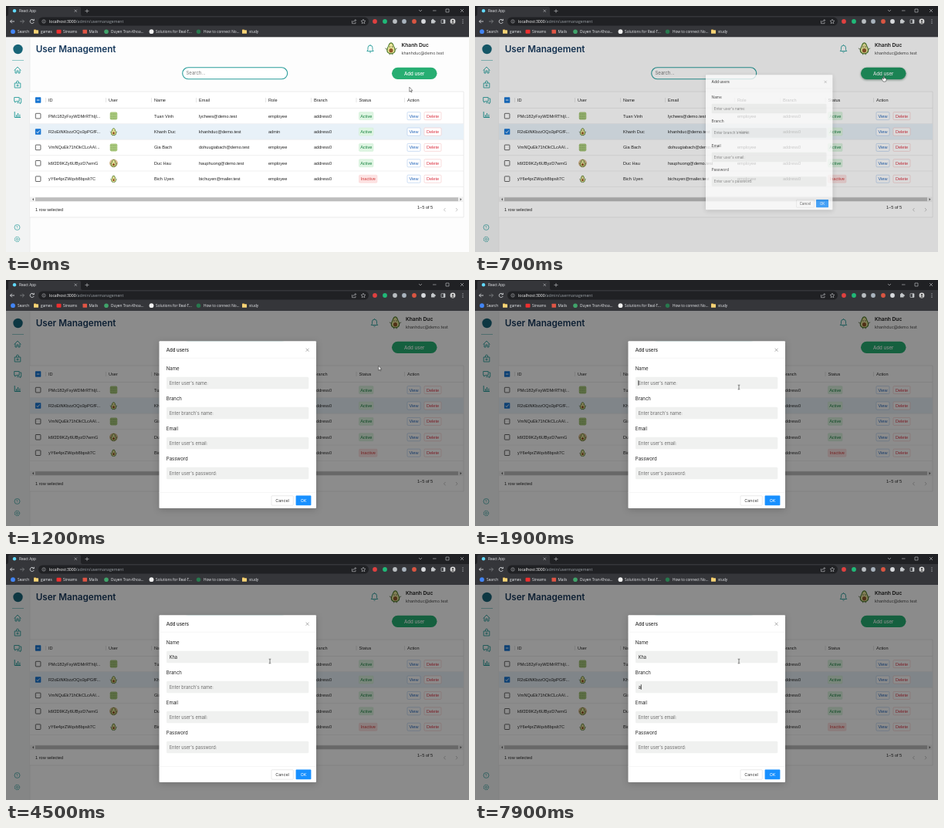
These frames come from a looping animation (600 px wide and 319 px high, 8 s). An HTML page:

```html
<!DOCTYPE html>
<html lang="en">
<head>
<meta charset="utf-8">
<title>User Management</title>
<style>
  html, body { margin: 0; width: 100%; height: 100%; overflow: hidden; background: #fff; }
  svg { display: block; width: 100vw; height: 100vh; }
  text { white-space: pre; }
  .ui { font-family: Inter, "Open Sans", sans-serif; }
  .grid { font-family: "Liberation Sans", Arial, sans-serif; font-size: 5.6px; fill: #222; }
  .chrome { font-family: "Open Sans", "Noto Sans", sans-serif; fill: #e8eaed; }
  #modal { filter: drop-shadow(0 2.2px 4px rgba(0, 0, 0, .18)); }
  #addButton.hover { fill: #1f9862; filter: drop-shadow(0 1px 1.5px rgba(0, 60, 30, .5)); }
</style>
</head>
<body>
<svg id="stage" viewBox="0 0 600 319" xmlns="http://www.w3.org/2000/svg"></svg>
<script>
const LOOP = 8000;
const FADE = { start: 647, length: 170 }, ZOOM = { start: 660, length: 222 };
const TEAL = '#2a9d9b', NAVY = '#17395c', TOP = 40.3;
const stage = document.getElementById('stage');

const rect = (x, y, w, h, fill, r = 0, extra = '') =>
  `<rect x="${x}" y="${y}" width="${w}" height="${h}" rx="${r}" fill="${fill}" ${extra}/>`;
const circle = (x, y, r, fill, extra = '') => `<circle cx="${x}" cy="${y}" r="${r}" fill="${fill}" ${extra}/>`;
const line = (d, color, w = 0.6, extra = '') =>
  `<path d="${d}" fill="none" stroke="${color}" stroke-width="${w}" ${extra}/>`;
const text = (x, y, s, size, fill, extra = '') =>
  `<text x="${x}" y="${y}" ${size ? `font-size="${size}"` : ''} ${fill ? `style="fill:${fill}"` : ''} ${extra}>${s}</text>`;
const group = (cls, body, extra = '') => `<g class="${cls}" ${extra}>${body}</g>`;
const outline = (color, w = 0.5) => `stroke="${color}" stroke-width="${w}"`;

function avocado(x, y, s) {
  return `<g transform="translate(${x} ${y}) scale(${s})">
    <path d="M0-8C3-8 3.5-4 5-1C8 5 4 8 0 8C-4 8-8 5-5-1C-3.5-4-3-8 0-8Z" fill="#4f7a2b"/>
    <path d="M0-6.6C2-6.6 2.7-3 4-.5C6.2 4.3 3.5 6.8 0 6.8C-3.5 6.8-6.2 4.3-4-.5C-2.7-3-2-6.6 0-6.6Z" fill="#e9e59a"/>
    ${circle(0, 3, 2.7, '#91592b')}${circle(-1.6, -2, 0.6, '#222')}${circle(1.6, -2, 0.6, '#222')}
    ${line('M-5 2L-8 0M5 2L8 0M-2 7.5V9M2 7.5V9', '#3c5524', 0.8)}</g>`;
}

function cactus(x, y) {
  return rect(x - 4.8, y - 5, 9.6, 10, '#abc97f', 1.8) +
    line(`M${x - 4} ${y - 2.5}H${x + 4}M${x - 4} ${y + 0.5}H${x + 4}M${x - 4} ${y + 3.3}H${x + 4}`, '#7ca556', 0.8, 'stroke-dasharray="1.6 .9"');
}

const folder = x => rect(x, 30.4, 3, 2, '#e8b64a', 0.4) + rect(x, 31.2, 6, 4.6, '#f7d376', 0.5);

function browser() {
  const link = (x, s) => text(x, 35, s, 4.8);
  const gray = '#c4c7ca';
  const dots = [[478, '#e04040'], [491, '#20b978'], [504, '#b9bdc1'], [516, '#a9b3bd'], [529, '#d95542'], [541, '#d8dadd']];
  return group('chrome',
    rect(0, 0, 600, TOP, '#35363a') + rect(0, 0, 600, 13, '#202124') +
    `<path d="M1 13Q3 13 3 10V3Q3 1 5 1H95Q97 1 97 3V10Q97 13 99 13Z" fill="#35363a"/>` +
    circle(11, 6.3, 2.2, '#61dafb') + text(17, 8.2, 'React App', 4.7) +
    line('M88.7 4.7l3.2 3.2m0-3.2l-3.2 3.2M102.5 6.5h5m-2.5-2.5v5', gray) +
    line('M535 5l2 2 2-2M553 6h4.5M570 4h4v4h-4zM589 4l4 4m0-4l-4 4', gray) +
    line('M11 20H5.5m2.3-2.3L5.5 20l2.3 2.3', '#e8eaed', 0.8) +
    line('M18 20h5.5m-2.3-2.3l2.3 2.3-2.3 2.3', '#85878a', 0.8) +
    line('M36 18.6A2.6 2.6 0 1 0 36.2 21M36.3 16.8v2h-2', '#e8eaed', 0.8) +
    rect(42, 14.5, 428, 11, '#202124', 5.5) +
    circle(49, 20, 2.2, 'none', outline(gray)) + line('M49 19.6v1.6M49 18.4v.6', gray) +
    text(56, 22, 'localhost:3000<tspan style="fill:#9aa0a6">/admin/usermanagement</tspan>', 5.15, '#fff') +
    line('M448.5 19v3.7h4.5v-2M450 21q0-2.5 3.5-2.5m-1.2-1.4l1.4 1.4-1.4 1.4', gray) +
    line('M463 17.2l.9 1.9 2 .2-1.5 1.4.4 2-1.8-1-1.8 1 .4-2-1.5-1.4 2-.2z', gray) +
    dots.map(([x, c]) => circle(x, 20, 2.9, c)).join('') +
    rect(551, 18, 4.5, 4.5, gray, 0.6) + circle(553.2, 17.9, 1.1, gray) + circle(555.7, 20.2, 1.1, gray) +
    rect(564, 17.7, 5, 4.8, 'none', 0.4, outline(gray, 0.7)) + rect(566.8, 17.7, 2.2, 4.8, gray) +
    circle(579, 20, 3.4, '#d8d8d8') + circle(579, 19.2, 1.2, '#454545') +
    `<path d="M576.8 22.4q2.2-3 4.4 0z" fill="#454545"/>` +
    [17.8, 20, 22.2].map(y => circle(592, y, 0.6, gray)).join('') +
    circle(9, 33.2, 2.9, '#4285f4') + link(15, 'Search') +
    folder(36) + link(45, 'games') +
    rect(65.5, 30.8, 6, 5, '#ee2f2f', 1) + link(74, 'Streams') +
    rect(99.5, 30.8, 5.5, 5, '#e05545', 0.5) + link(107.5, 'Mails') +
    circle(130, 33.2, 2.8, '#40a36a') + link(136, 'Duyen Tran-Khoa...') +
    circle(188.5, 33.2, 2.9, '#f2f2f2') + link(194, 'Solutions for Real-T...') +
    circle(249.5, 33.2, 2.7, '#27794e') + link(256, 'How to connect No...') +
    folder(306) + link(315, 'study'));
}

function sidebar() {
  return rect(0, TOP, 31, 279, '#f2f3f3') + line('M31 41V319', '#e4e6e6') +
    circle(15.5, 56, 6.2, '#176477') + line('M8 70.5H23', TEAL, 0.5) +
    line('M10.7 83.5L15 79l4.3 4.5M12 82.5V87h2v-3h2v3h2v-4.5', TEAL, 0.9) +
    line('M11.2 100h7.6v6h-7.6zM13.3 100q0-3 1.7-3t1.7 3M13.3 103h3.4m-1.7-1.5v3', TEAL, 0.9) +
    line('M10.7 118.5h6.5v5h-4l-1.5 1.7v-1.7h-1zM18 120h1.7v5.3h-1v1.5l-1.6-1.5H14', TEAL, 0.9) +
    line('M11.2 137v7.5H19M13.5 144v-3m2 3v-5m2.3 5v-3.4', TEAL, 1) +
    circle(14.5, 287, 3.5, 'none', outline(TEAL, 0.7)) + text(13.1, 289, '?', 5, TEAL, 'class="ui"') +
    circle(14.5, 302.5, 3.2, 'none', outline(TEAL, 0.9) + ' stroke-dasharray="1.8 .7"') +
    circle(14.5, 302.5, 1.3, 'none', outline(TEAL, 0.7));
}

function checkbox(y, state) {
  if (!state) return rect(38.3, y - 3.3, 6.6, 6.6, '#fff', 0.7, outline('#555', 0.9));
  const mark = state === 'some' ? `M39.8 ${y}h3.6` : `M39.6 ${y}l1.5 1.6 2.6-3.2`;
  return rect(37.9, y - 3.7, 7.4, 7.4, '#1976d2', 0.8) + line(mark, '#fff', 0.9);
}

function pill(x, y, w, label, bg, border, color) {
  return rect(x, y - 5, w, 10, bg, 1.2, outline(border)) +
    text(x + w / 2, y + 2, label, 0, color, 'text-anchor="middle"');
}

const people = [
  ['PMc182yFxyWDMrRThIjl...', 'Tuan Vinh', 'lychees@demo.test', 'employee'],
  ['R2oEtNKbzzOQo3pPGfF...', 'Khanh Duc', 'khanhduc@demo.test', 'admin'],
  ['VmNQuEk71hOkCLcAAI...', 'Gia Bach', 'dohuugiabach@demo.test', 'employee'],
  ['k6f2D9KZy6UByzD7wmG', 'Duc Hau', 'hauphuong@demo.test', 'employee'],
  ['yY6e4prZWqvb8bpsIt7C', 'Bich Uyen', 'bichuyen@mailer.test', 'employee']
];

function tableRow([id, name, mail, role], i) {
  const y = 142.6 + i * 20.4, base = y + 2;
  const face = i % 2 === 0 && i < 4 ? cactus(139.5, y)
    : (i === 3 ? circle(139.5, y, 5.4, '#d7b98c') : '') + avocado(139.5, y, i === 4 ? 0.55 : 0.6);
  const status = i === 4
    ? pill(457.5, y, 23.5, 'Inactive', '#fde3e3', '#fbd0d0', '#d23c3c')
    : pill(457.5, y, 18.5, 'Active', '#def5e2', '#cdecd3', '#15803d');
  return (i === 1 ? rect(31, y - 10.2, 562, 20.4, '#e8f1f8') : '') +
    line(`M31 ${y + 10.2}H593`, '#e0e0e0', 0.5) + checkbox(y, i === 1) + face +
    text(55, base, id) + text(192, base, name) + text(250, base, mail) +
    text(340, base, role) + text(399, base, 'address0') + status +
    pill(520, y, 17, 'View', '#fff', '#9dbfe8', '#1f62b8') +
    pill(542, y, 22, 'Delete', '#fff', '#f2b9b9', '#dc3545');
}

function table() {
  const heads = [[55, 'ID'], [133, 'User'], [192, 'Name'], [250, 'Email'], [340, 'Role'],
    [399, 'Branch'], [457.5, 'Status'], [520, 'Action']];
  return group('grid',
    rect(31, 111, 562, 163, '#fff') + line('M31 111H593V274H31M31 132.4H593', '#dedede', 0.6) +
    checkbox(122, 'some') +
    heads.map(([x, s]) => text(x, 124, s) + line(`M${x - 3.5} 119V125`, '#d5d5d5')).join('') +
    people.map(tableRow).join('') +
    rect(31, 247.5, 562, 6.5, '#f1f1f1') + rect(38, 248.3, 548, 4.8, '#bdbdbd') +
    `<path d="M36 249v3.4l-2-1.7zM588.5 249v3.4l2-1.7z" fill="#666"/>` +
    text(38, 266, '1 row selected') + text(533, 263, '1–5 of 5') +
    line('M569.5 262l-2 2.2 2 2.2M583 262l2 2.2-2 2.2', '#aaa', 0.7));
}

function page() {
  return rect(31, TOP, 569, 279, '#fdfdfd') + sidebar() +
    text(38.7, 60.3, 'User Management', 11.7, NAVY, 'class="ui" font-weight="600"') +
    group('ui', line('M467.8 58.5h8.4l-1.2-1.7v-2.7a3 3 0 0 0-6 0v2.7zM471 59.8q1 1 2 0M472 51v-1', TEAL, 0.9) +
      avocado(499, 54.8, 0.95) +
      text(512.5, 53.2, 'Khanh Duc', 6.7, '#1c1c1c', 'font-weight="600"') +
      text(512.5, 62.5, 'khanhduc@demo.test', 5.3, '#444'), 'id="account"') +
    rect(228.7, 79.8, 136, 15, '#fff', 7.5, outline(TEAL, 1.1)) +
    text(233.5, 89.4, 'Search...', 6, '#777', 'class="ui"') +
    rect(500, 79.7, 58.5, 15.2, '#27ae72', 7.6, 'id="addButton"') +
    text(529.2, 89.6, 'Add user', 6.1, '#fff', 'class="ui" text-anchor="middle" font-weight="500"') +
    table() + rect(0, TOP, 600, 279, '#000', 0, 'id="mask" opacity="0"');
}

const labels = ['Name', 'Branch', 'Email', 'Password'];
const hints = ["Enter user's name:", "Enter branch's name:", "Enter user's email:", "Enter user's password:"];

function modal() {
  const field = (label, i) => {
    const y = 117 + i * 39;
    return text(207.8, y, label, 6, '#222') + rect(208, y + 8.8, 184.3, 15.4, '#f0f1f0', 1.5) +
      text(211.7, y + 18.6, hints[i], 5.7, '#6a6a6a', `id="field${i}"`);
  };
  return group('ui',
    rect(198.5, 79.3, 203.5, 216.8, '#fff', 1) +
    text(207.8, 92.6, 'Add users', 6, '#222', 'font-weight="500"') +
    line('M388.6 88.7l4 4m0-4l-4 4', '#777', 0.6) +
    line('M198.5 101.3H402M198.5 275.5H402', '#ececec', 0.5) +
    labels.map(field).join('') + line('M0 0V6.6', '#111', 0.7, 'id="caret"') +
    rect(344, 279.8, 28.3, 12.4, '#fff', 0.8, outline('#d5d5d5')) +
    text(358.1, 288.2, 'Cancel', 5.4, '#333', 'text-anchor="middle"') +
    rect(375.6, 279.6, 19.8, 12.7, '#1890ff', 0.8) +
    text(385.5, 288.2, 'OK', 5.4, '#fff', 'text-anchor="middle"'),
    'id="modal"');
}

const pointers = {
  arrow: `<path d="M0 0V6L1.4 4.8L2.3 6.8L3.2 6.4L2.3 4.5H4.1Z" fill="#fff" ${outline('#222')}/>`,
  hand: `<path d="M-.6 0Q0-.6.6 0V2.4L3 3V5.2L2.2 7H-1L-2.7 4.2Q-2-.0-.6 4Z" fill="#fff" ${outline('#222')}/>`,
  beam: line('M-1.3-2.8H-.3L0-2.5.3-2.8H1.3M0-2.5V2.5M-1.3 2.8H-.3L0 2.5.3 2.8H1.3', '#222', 0.6)
};

stage.innerHTML = page() + modal() + browser() +
  Object.entries(pointers).map(([k, v]) => `<g id="${k}">${v}</g>`).join('');

const $ = id => document.getElementById(id);
const progress = (t, { start, length }) => Math.max(0, Math.min(1, (t - start) / length));

function easeOutCirc(x) {
  const bez = (u, a, b) => 3 * u * (1 - u) ** 2 * a + 3 * u * u * (1 - u) * b + u ** 3;
  let lo = 0, hi = 1;
  for (let i = 0; i < 24; i++) {
    const mid = (lo + hi) / 2;
    if (bez(mid, 0.08, 0.17) < x) lo = mid; else hi = mid;
  }
  return bez(hi, 0.82, 1);
}

const path = [[0, 522.8, 105.2], [400, 530, 91], [700, 530, 91], [800, 532, 101.5], [1000, 532, 101.5], [1600, 342, 139]];
function pointerAt(t) {
  const next = path.findIndex(p => p[0] > t);
  if (next < 0) return path[path.length - 1].slice(1);
  const [a, b] = [path[next - 1], path[next]];
  const k = (t - a[0]) / (b[0] - a[0]), s = k * k * (3 - 2 * k);
  return [a[1] + (b[1] - a[1]) * s, a[2] + (b[2] - a[2]) * s];
}

// time, active field, its value
const edits = [[1700, 0, ''], [3200, 0, 'K'], [3500, 0, 'Kh'], [3800, 0, 'Kha'], [5900, 1, ''], [7600, 1, 'a']];

function updateFields(t) {
  const values = ['', ''];
  let last = null;
  for (const edit of edits) if (t >= edit[0]) { last = edit; values[edit[1]] = edit[2]; }
  values.forEach((value, i) => {
    $('field' + i).textContent = value || hints[i];
    $('field' + i).style.fill = value ? '#222' : '#6a6a6a';
  });
  const lit = last && (t - last[0]) % 1000 < 500;
  $('caret').setAttribute('visibility', lit ? 'inherit' : 'hidden');
  if (lit) {
    const x = 211.8 + (last[2] ? $('field' + last[1]).getComputedTextLength() + 0.3 : 0);
    $('caret').setAttribute('transform', `translate(${x} ${130.2 + last[1] * 39})`);
  }
}

function update(t) {
  const eased = easeOutCirc(progress(t, ZOOM)), scale = 0.2 + 0.8 * eased;
  const open = t >= ZOOM.start;
  $('mask').setAttribute('opacity', 0.45 * progress(t, FADE));
  $('modal').setAttribute('visibility', open ? 'visible' : 'hidden');
  $('modal').setAttribute('opacity', open ? eased : 0);
  $('modal').setAttribute('transform', `translate(721 131) scale(${scale}) translate(-721 -131)`);
  $('account').setAttribute('transform', `translate(${open ? 5.5 : 0} 0)`);
  updateFields(t);

  const [x, y] = pointerAt(t);
  const onButton = x > 500 && x < 558 && y > 80 && y < 95;
  const kind = onButton ? 'hand' : x < 392 && y > 126 ? 'beam' : 'arrow';
  $('addButton').classList.toggle('hover', onButton);
  for (const name in pointers) {
    $(name).setAttribute('visibility', name === kind ? 'visible' : 'hidden');
    $(name).setAttribute('transform', `translate(${x} ${y})`);
  }
}

const start = performance.now();
function tick() {
  const t = (performance.now() - start) % LOOP;
  update(Math.floor(t / 100) * 100);
  requestAnimationFrame(tick);
}
tick();
</script>
</body>
</html>
```
